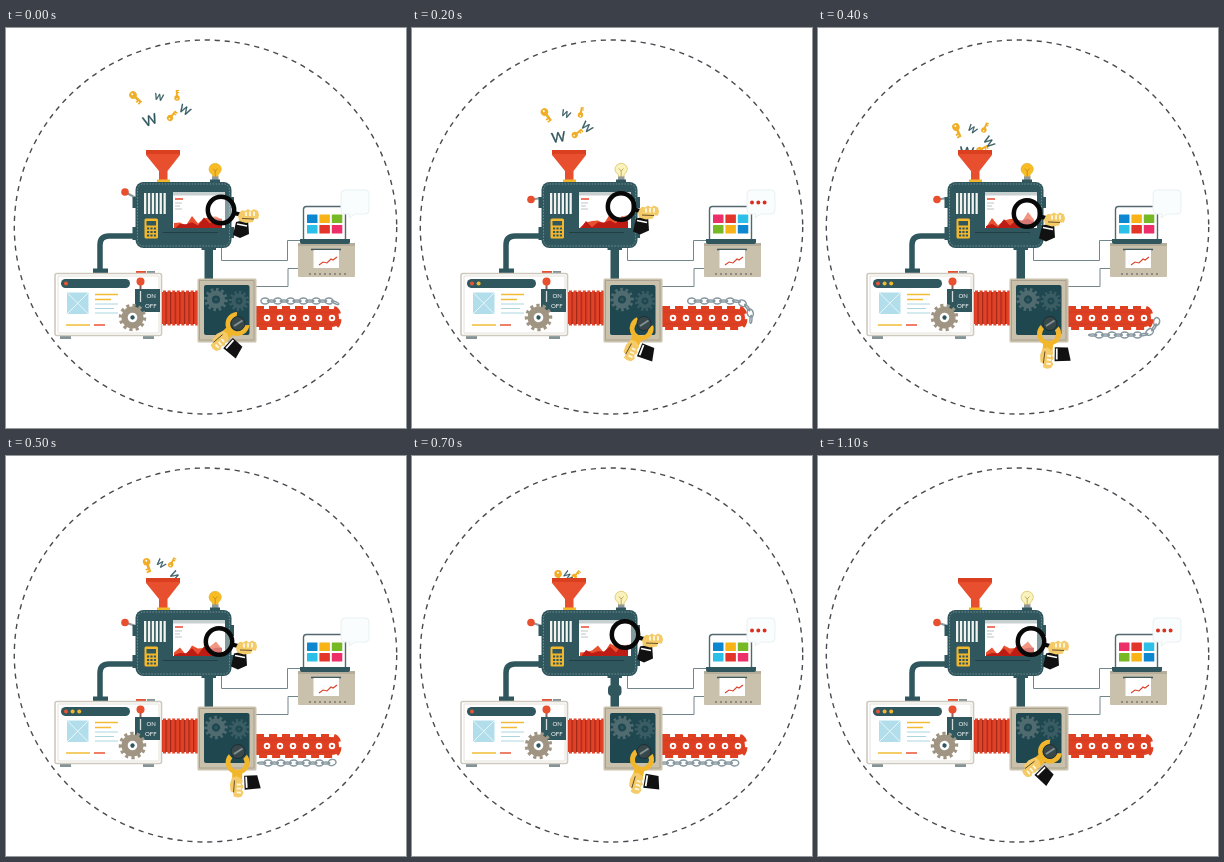
Animation, 400 px wide and 400 px high, one loop 1200 ms. Source, as an HTML page:

```html
<!DOCTYPE html>
<html lang="en">
<meta charset="utf-8">
<title>Machine</title>
<style>
html, body { margin: 0; width: 100%; height: 100%; overflow: hidden; background: #fff }
svg { display: block; width: 100vw; height: 100vh }
text { font-family: Lato, Arial, sans-serif }
.teal { fill: #30575e } .red { fill: #e84f2e } .sand { fill: #c9c1ac } .gold { fill: #f3b72c }
.line { fill: none; stroke: #72868b }
</style>
<svg viewBox="0 0 400 400">
  <defs>
    <clipPath id="above"><path d="M100 0H220V122H100Z"/></clipPath>
    <clipPath id="screen"><path d="M167 164H219V200H167Z"/></clipPath>
    <g id="key" fill="#f0ad25">
      <path d="M0-1.200H10V3H8.500V1H7.500V3H6V1.200H0Z"/>
      <circle r="3.400"/><circle cx="-1" r=".9" fill="#fff"/>
    </g>
    <g id="fist">
      <path d="M2 2Q4-1 7 1L10-1 13 1 16-1 20 1 21 5 20 9 16 9 15 12 8 13 1 11 0 6Z" fill="#f4cb68"/>
      <path d="M8 2V6M12 1.500V6M16 1.500V6" stroke="#fff8e0" stroke-width="1.800"/>
      <path d="M4 8.500L16 9" stroke="#5e4624" stroke-width=".9"/>
    </g>
  </defs>
  <ellipse cx="199.500" cy="199" rx="191.200" ry="187" fill="none" stroke="#484b4f" stroke-width="1.400" stroke-dasharray="5.200 4.800"/>

  <!-- wires and laptop -->
  <path class="line" d="M215.500 219V232.500H281.500V212.500H294M249 258.500H282V240.500H293"/>
  <rect x="297.500" y="178.500" width="42" height="35" rx="3" fill="#fff" stroke="#52686e" stroke-width="1.400"/>
  <g id="tiles"></g>
  <rect class="sand" x="292" y="215" width="57" height="34" rx="1"/>
  <path fill="#b5ad9b" d="M292 215H349V218H292Z"/>
  <path class="teal" d="M294 211H344V214Q344 216 341 216H297Q294 216 294 214Z"/>
  <path stroke="#435c61" stroke-width="1.600" d="M305 221.500H335"/>
  <path fill="#fff" d="M307.500 222H333V240H307.500Z"/>
  <path fill="none" stroke="#d9422c" stroke-width="1.100" d="M313 237l4-3 4 1 4-4 2 1 4-3"/>
  <path stroke="#80796d" stroke-width="1.500" stroke-dasharray="2 3" d="M303 246H341"/>
  <path d="M339 162H359Q363 162 363 166V182Q363 186 359 186H349L343 190 344 186H339Q335 186 335 182V166Q335 162 339 162Z" fill="#fafdfe" stroke="#e8f1f2"/>
  <path id="talk" d="M340 174.500H353" stroke="#dc2f20" stroke-width="4" stroke-linecap="round" stroke-dasharray="0 6.300"/>

  <!-- pipes -->
  <path d="M130 208H103Q94 208 94 217V242" fill="none" stroke="#30575e" stroke-width="5.500"/>
  <path class="teal" d="M87 240.500H102V246H87ZM198.500 217H207V252H198.500ZM195.500 218H210V222H195.500Z"/>
  <rect id="bulge" class="teal" x="196" width="13.500" height="11" rx="4"/>

  <!-- falling items and funnel -->
  <g id="items" clip-path="url(#above)"></g>
  <path class="red" d="M140 122H174V127L161.500 143V153H153V143L140 127Z"/>
  <path d="M140 122H174V126H140Z" fill="#da4020"/>
  <path class="gold" d="M151 151.500H164V156H151Z"/>

  <!-- lamp and lever -->
  <g id="lamp" stroke="#d9b138" stroke-width=".6">
    <path d="M206.500 149V147Q203 144 203 141.500A6.200 6.200 0 0 1 215.400 141.500Q215 144 212 147V149Z"/>
    <path d="M209.200 149V143L207 140.500M209.200 143L211.500 140.500" fill="none" stroke="#a8761d"/>
  </g>
  <path fill="#8f999b" d="M206 148.500H212.500V152H206Z"/>
  <path class="teal" d="M204 151.500H214V156H204Z"/>
  <path id="rod" stroke="#8d999c" stroke-width="2"/>
  <circle id="knob" class="red" cx="119" r="3.800"/>

  <!-- main machine -->
  <path class="teal" d="M126.500 169H133V180H126.500ZM126.500 199H133V212H126.500ZM224 169H228V180H224ZM224 199H228V210H224Z"/>
  <rect class="teal" x="129.500" y="154" width="96" height="66" rx="8"/>
  <rect x="131.500" y="156" width="92" height="62" rx="6" fill="none" stroke="#8aa3a6" stroke-width=".7" stroke-dasharray="1.500 1.500"/>
  <path d="M138 175.500H160" stroke="#f2f3ee" stroke-width="21" stroke-dasharray="2.300 1.600"/>
  <rect class="gold" x="138.500" y="190.500" width="13.500" height="20" rx="1.500"/>
  <path class="teal" d="M140.500 193H150V197.500H140.500Z"/>
  <path d="M141 200.500H150M141 204H150M141 207.500H150" stroke="#30575e" stroke-width="2.200" stroke-dasharray="2.200 1.200"/>
  <path d="M157 204.500H212" stroke="#203e44"/>
  <path fill="#fff" d="M167 164H219V200H167Z"/>
  <path fill="#c7d0d1" d="M167 164H219V167.500H167Z"/>
  <path d="M169 171H177" stroke="#e74a2f" stroke-width="1.500"/>
  <path d="M169 175H176M169 178H174M169 181H176" stroke="#aab5b7" stroke-width=".8"/>
  <g clip-path="url(#screen)"><path id="back" fill="#e9502f"/><path id="peaks" fill="#bd1c14"/></g>
  <g id="lens">
    <path fill="#111" d="M15 12L27 9 28 24 19 28 12 25Z"/>
    <path d="M16 14L26 16" stroke="#fff" stroke-width="1.600"/>
    <circle r="13.200" fill="#fff" fill-opacity=".4" stroke="#080808" stroke-width="4.500"/>
    <path d="M13 3L21 5" stroke="#080808" stroke-width="4"/>
    <use href="#fist" x="17"/>
  </g>

  <!-- page machine -->
  <path class="red" d="M130 243H140V246H130Z"/>
  <path fill="#849396" d="M141 243H149V246H141ZM54 307H65V311H54ZM137 307H148V311H137Z"/>
  <rect x="49" y="245.500" width="106.500" height="62" rx="2" fill="#fff" stroke="#cec9be" stroke-width="1.600"/>
  <path fill="none" stroke="#e6e2d9" d="M52 248H153V305H52Z"/>
  <rect class="teal" x="55" y="251" width="69" height="9" rx="4.500"/>
  <g id="dots"></g>
  <path fill="#b1deea" d="M61 264.500H82.500V286H61Z"/>
  <path d="M61 264.500L82.500 286M82.500 264.500L61 286" stroke="#e9f7fa"/>
  <path d="M89 266.500H112M89 271.500H105M60 297H84" stroke="#f2bd35" stroke-width="1.700"/>
  <path d="M89 276H112M89 280.500H108M89 285H112" stroke="#a9d6de"/>
  <path d="M88 297H99" stroke="#ea5434" stroke-width="1.500"/>
  <path d="M134.500 255V264" stroke="#8b6259" stroke-width="2"/>
  <circle class="red" cx="134.500" cy="253.500" r="4"/>
  <path class="teal" d="M129 261H154V284H129Z"/>
  <g fill="#fff" font-size="6"><text x="140.500" y="270">ON</text><text x="139" y="280">OFF</text></g>
  <path d="M134.500 263V274" stroke="#d5dddc" stroke-width="1.300"/>
  <g id="cog"></g>

  <!-- bellows and belt -->
  <path fill="#d83b20" d="M156 264H192V296H156Z"/>
  <path d="M157 280H192" stroke="#e0432a" stroke-width="35" stroke-dasharray="3 1.600"/>
  <path d="M159.500 280H192" stroke="#9c2717" stroke-width="32" stroke-dasharray=".9 3.700"/>
  <g id="chain" fill="none" stroke="#8798a0" stroke-width="1.500"></g>
  <path fill="#df4022" d="M248 281H326Q333 281 333 290T326 299H248Z"/>
  <path d="M250 280H328Q333.500 282 333.500 290T328 300H250" fill="none" stroke="#df4022" stroke-width="4" stroke-dasharray="8 5"/>
  <path d="M250 284H327M250 296H327" stroke="#c93b27" stroke-width=".8"/>
  <g id="holes" fill="#d9381c" stroke="#fff" stroke-width="1.900"></g>

  <!-- gearbox and wrench -->
  <rect class="sand" x="191.500" y="250.500" width="59" height="64" rx="1.500"/>
  <path fill="none" stroke="#aaa18e" d="M193.500 252.500H248V312H193.500Z"/>
  <rect x="198" y="257" width="45.500" height="50" rx="2" fill="#1f474f"/>
  <g id="gears"></g>
  <g id="wrench">
    <path fill="#111" d="M13-7L27-8 25-24 12-20Z"/>
    <path d="M14-9L25-10" stroke="#fff" stroke-width="1.800"/>
    <path d="M-8-9A12 12 0 1 1-8 9L-4 5.500A7 7 0 1 0-4-5.500ZM9-5H29Q33 0 29 5H9Z" fill="#f2b62d"/>
    <use href="#fist" x="14" y="-6"/>
  </g>
  <circle cx="232" cy="295.500" r="7" fill="#38474a" stroke="#1d2f34"/>
  <path d="M228 298L236.500 292.500" stroke="#829092" stroke-width="2"/>
</svg>
<script>
const $ = id => document.getElementById(id);
const cos = (n, period) => Math.cos(2 * Math.PI * n / period);
const sin = (n, period) => Math.sin(2 * Math.PI * n / period);
const range = (count, make) => Array.from({ length: count }, (_, i) => make(i)).join('');
const place = (id, x, y, turn = 0) => $(id).setAttribute('transform', `translate(${x} ${y}) rotate(${turn})`);

// Falling items: kind, size, starting x, y and angle.
const items = [
  ['key', 1.1, 127, 67, 42], ['key', .8, 171, 70, -92], ['key', .9, 164, 90, -50],
  ['W', 9, 153, 69, 12], ['W', 11, 179, 82, 30], ['W', 14, 144, 92, -20]
];

// Items slow slightly as they fall and drift towards the funnel's axis.
function item([kind, size, x0, y0, turn], n) {
  const x = x0 + (157 - x0) * n / 11, y = y0 + 9 * n - n * n / 4;
  if (y > 125) return '';
  const at = `translate(${x} ${y}) rotate(${turn + 6 * n})`;
  return kind == 'key' ? `<use href="#key" transform="${at} scale(${size})"/>`
    : `<text transform="${at}" y="${size * .36}" font-size="${size}" text-anchor="middle" fill="#30575e" stroke="#30575e" stroke-width=".3">W</text>`;
}

const gear = (x, y, r, turn, color, hole) => `<g transform="translate(${x} ${y}) rotate(${turn})">
  <circle r="${r}" fill="none" stroke="${color}" stroke-width="3.500" pathLength="120" stroke-dasharray="5 5"/>
  <circle r="${r - 1}" fill="${color}"/><circle r="${r * .4}" fill="${hole}"/><circle r="${r * .18}" fill="#30575e"/></g>`;

// The chain runs along the top, around the end and back below.
function link(s, i) {
  const bend = 17 * Math.PI, a = Math.min(Math.PI, Math.max(0, (s - 72) / 17));
  const straight = Math.min(s, 72) - Math.max(0, s - 72 - bend);
  const x = 250 + straight + 17 * Math.sin(a), y = 290 - 17 * Math.cos(a);
  return x < 252 ? '' : `<ellipse rx="4" ry="${i % 2 ? 1 : 3}" transform="translate(${x} ${y}) rotate(${a * 180 / Math.PI})"/>`;
}

const ridge = (n, base, slope, amp) => 'M168 200' + range(9, i =>
  `L${168 + i * 6} ${base - i * slope - i % 2 * 4 - amp * cos(n + i * 2, 6)}`) + 'V200Z';

const colors = ['#0d87cf', '#f8b417', '#77b825', '#2cbfe8', '#e4352b', '#ec2f68'];
const mirrored = colors.toReversed();

$('holes').innerHTML = range(6, i => `<circle cx="${261 + i * 13}" cy="290" r="2.300"/>`);

function draw(n) {
  const lit = n % 4 < 2;
  $('lamp').setAttribute('fill', lit ? '#f9bc22' : '#f8f2bd');
  $('talk').style.display = lit ? 'none' : '';
  $('items').innerHTML = items.map(i => item(i, n)).join('');

  const ballY = 169 - 5 * cos(n, 6);
  $('rod').setAttribute('d', `M130 170L119 ${ballY}`);
  $('knob').setAttribute('cy', ballY);

  const palette = sin(n, 8) > .1 ? mirrored : colors;
  $('tiles').innerHTML = range(6, i =>
    `<rect x="${301 + i % 3 * 12.4}" y="${i < 3 ? 186.5 : 197}" width="10.500" height="8.500" rx=".6" fill="${palette[i]}"/>`);

  $('back').setAttribute('d', ridge(n, 198, 1, 3));
  $('peaks').setAttribute('d', ridge(n + 2, 200, .9, 2));
  place('lens', 211 + 4 * cos(n, 6), 182 - 4 * sin(n, 6));

  $('dots').innerHTML = range(1 + Math.floor(n % 6 / 2), i =>
    `<circle cx="${60 + i * 6.6}" cy="255.500" r="2" fill="${i ? '#f3b72c' : '#ea5434'}"/>`);

  $('bulge').style.display = n > 4 && n < 9 ? '' : 'none';
  $('bulge').setAttribute('y', 217 + (n - 6) * 12);

  $('cog').innerHTML = gear(126.5, 289.5, 12, n * 10, '#a09583', '#fff');
  $('gears').innerHTML = gear(210, 271.5, 10, n * 10, '#4f6b70', '#1f474f') + gear(233, 273, 8.5, -n * 10, '#3a5c63', '#1f474f');

  // The chain moves in uneven pulls.
  const tail = 5 + 19 * n - 20 * sin(n, 6);
  $('chain').innerHTML = range(12, i => link(tail + 4 + i * 6.4, i));

  const swing = cos(n + 1, 12), turn = 116 + 24 * swing, slide = 5.5 - 5.5 * swing;
  const a = turn * Math.PI / 180;
  place('wrench', 232 + slide * Math.cos(a), 295.5 + slide * Math.sin(a), turn);
}

let last = -1;
function tick() {
  const n = Math.floor(performance.now() / 100) % 12;
  if (n != last) draw(last = n);
  requestAnimationFrame(tick);
}
tick();
</script>
</html>
```
